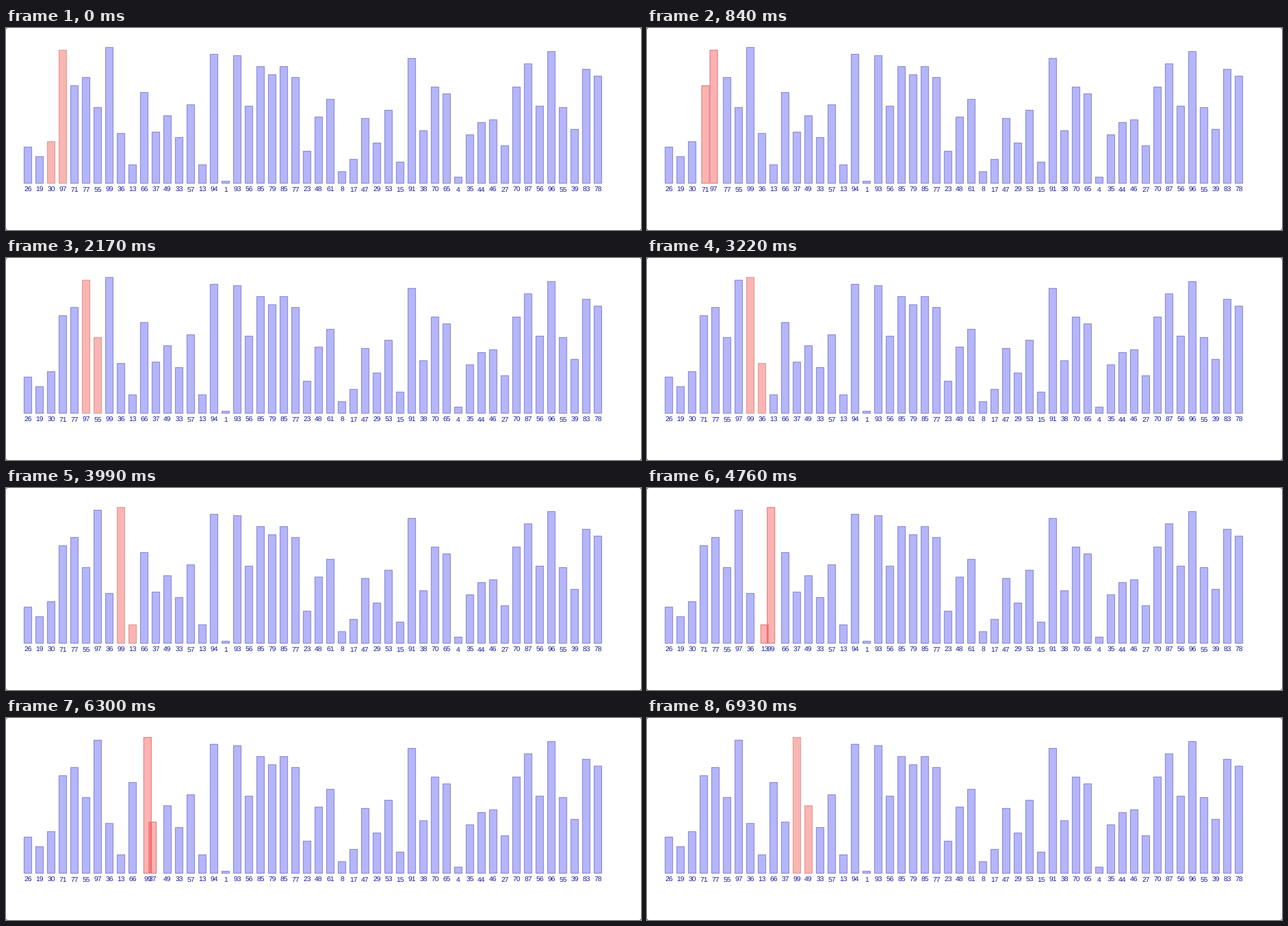
Animation of 928 by 296 pixels, one loop 7 s. Source, as a matplotlib script:

```python
import matplotlib.pyplot as plt
from matplotlib.animation import FuncAnimation
from matplotlib.patches import Polygon, Rectangle

W, H, DPI = 928, 296, 64
PX = 72 / DPI  # points per pixel
FRAMES, INTERVAL = 100, 70

# the numbers being sorted, which are also the labels
LABELS = ("26 19 30 97 71 77 55 99 36 13 66 37 49 33 57 13 94 1 93 56 "
          "85 79 85 77 23 48 61 8 17 47 29 53 15 91 38 70 65 4 35 44 "
          "46 27 70 87 56 96 55 39 83 78").split()
VALUES = [int(label) for label in LABELS]

STEP, LEFT, BAR_W, BASE = 17, 26.5, 11, 227.5

# fill and edge
BLUE = (("#0c0cf8", 0.3), "#9090d2")
REST = (("#ee0c02", 0.3), "#e39c9a")
MOVING = (("#ff0000", 0.3), "#e28282")
INK = "#1a1a9c"

# timing of the sort, in frames
FIRST_SLOT, ELAPSED = 2, 5.75
PAUSE, SWAP = 6.1, 6.5

plt.rcParams["text.hinting"] = "none"
fig = plt.figure(figsize=(W / DPI, H / DPI), dpi=DPI, facecolor="white")
ax = fig.add_axes([0, 0, 1, 1])
ax.set_xlim(0, W)
ax.set_ylim(H, 0)
ax.axis("off")

# window corners
for cx, dx in ((0, 2), (W, -2)):
    for cy, dy in ((0, 2), (H, -2)):
        ax.add_patch(Polygon([(cx, cy), (cx + dx, cy), (cx, cy + dy)],
                             facecolor="#777777", edgecolor="none"))

bars, texts = [], []
for value, label in zip(VALUES, LABELS):
    height = 2 * value + 1
    bars.append(ax.add_patch(Rectangle((0, BASE - height), BAR_W, height,
                                       linewidth=1.2 * PX, snap=False)))
    texts.append(ax.text(0, 240, label, family="Liberation Sans",
                         fontsize=10.4 * PX, color=INK, ha="center",
                         va="baseline"))


def bubble_pass(time):
    """Return the bar order, the compared slot and the swap progress."""
    order = list(range(len(VALUES)))
    for slot in range(FIRST_SLOT, len(order) - 1):
        if time < PAUSE:
            return order, slot, 0
        time -= PAUSE
        left, right = order[slot:slot + 2]
        if VALUES[left] > VALUES[right]:
            if time < SWAP:
                return order, slot, time / SWAP
            time -= SWAP
            order[slot:slot + 2] = right, left


def place(item, slot, colors):
    x = LEFT + STEP * slot
    bars[item].set(x=x, facecolor=colors[0], edgecolor=colors[1])
    texts[item].set_x(x + BAR_W / 2)


def update(frame):
    order, active, progress = bubble_pass(frame + ELAPSED)
    for slot, item in enumerate(order):
        place(item, slot, BLUE)
    colors = MOVING if progress else REST
    place(order[active], active + progress, colors)
    place(order[active + 1], active + 1 - progress, colors)
    return bars + texts


anim = FuncAnimation(fig, update, frames=FRAMES, interval=INTERVAL,
                     init_func=lambda: update(0), repeat=True, repeat_delay=0)
plt.show()
```
